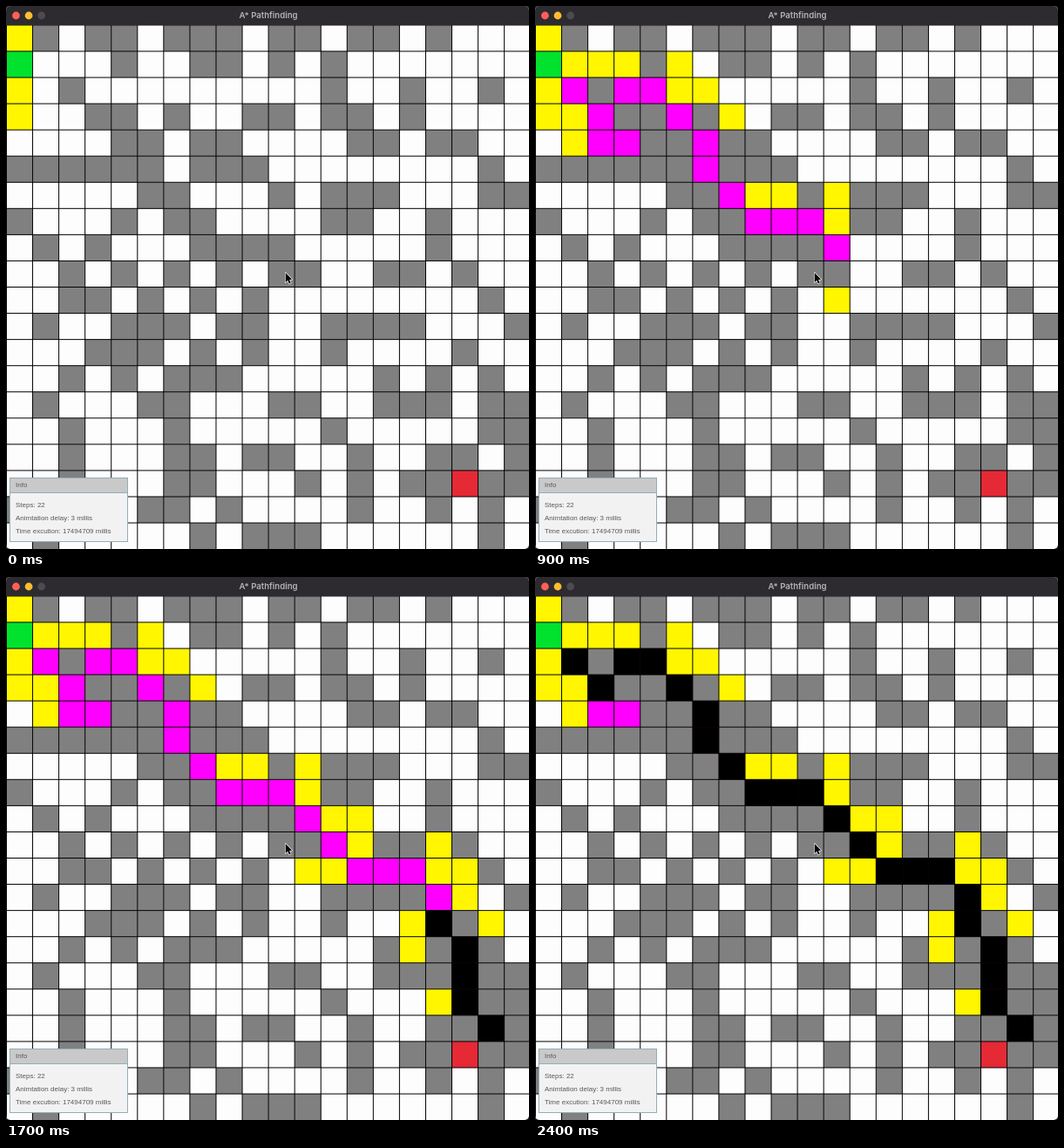
An HTML page with a canvas for the animation above (2.5 s loop, 600 by 623 pixels).

```html
<!DOCTYPE html>
<html lang="en">
<head>
<meta charset="utf-8">
<title>A* Pathfinding</title>
<style>
  html, body { margin: 0; width: 100%; height: 100%; overflow: hidden; background: #1c1b1e; }
  canvas { display: block; width: 600px; height: 623px; }
  h1 {
    position: absolute; left: 1px; top: 0; width: 600px; margin: 0;
    font: 600 9.6px/21px Inter, sans-serif; font-feature-settings: "calt" 0;
    color: #b4b3b6; text-align: center;
  }
</style>
</head>
<body>
<canvas id="stage" width="600" height="623"></canvas>
<h1>A* Pathfinding</h1>
<script>
const ctx = document.getElementById('stage').getContext('2d');
const W = 600, H = 623, SIZE = 20, PITCH = 30.06;
const LOOP = 2500, TICK = 100;
const COLORS = {
  wall: '#808080', open: '#fff600', closed: '#ff00ff', path: '#000',
  start: '#00e22d', goal: '#e52935'
};

const maze = [
  '.#.##.###.##.##.#...',
  '....#..##.#.#.......',
  '..#.........#..#..#.',
  '...##.#..##.##.#....',
  '....##.##....##.##..',
  '######.###........#.',
  '.....##...#.###...##',
  '#...#.##....##..#...',
  '.#.#...####.....#...',
  '..#.#.#.#.##..##.#..',
  '..##.#.#.#........#.',
  '.#..###.##..####...#',
  '...###.#.#..#....#..',
  '..#.#.###.....#.#.#.',
  '.#...##...##..###.##',
  '..#...#.....#.....##',
  '..#...##.##..#..##.#',
  '..#...##...#.#.##.##',
  '#....##.#....#..#.#.',
  '.#.....#.###......#.'
];

const cells = maze.map((row, y) => [...row].map((ch, x) => ({ x, y, wall: ch === '#' })));
const start = cells[1][0], goal = cells[17][17];
const toGoal = c => Math.hypot(goal.x - c.x, goal.y - c.y);

// Best-first search that records every repaint as [cell, colour].
// Cells opened on the right are painted one visit late.
function search() {
  const steps = [], open = [start], seen = new Set(open);
  const paint = (c, color) => steps.push([c, color]);
  let late = [], cur;

  while (!seen.has(goal)) {
    open.sort((a, b) => toGoal(a) - toGoal(b));
    cur = open.shift();
    const right = [];
    for (let dx = -1; dx <= 1; dx++) {
      for (let dy = -1; dy <= 1; dy++) {
        const next = cells[cur.y + dy]?.[cur.x + dx];
        if (!next || next.wall || seen.has(next)) continue;
        seen.add(next);
        next.from = cur;
        open.push(next);
        if (next === goal) continue;
        if (dx > 0) right.push(next);
        else paint(next, COLORS.open);
      }
      if (dx < 0) late.forEach(c => paint(c, COLORS.open));
    }
    late = right;
    if (cur !== start) paint(cur, COLORS.closed);
  }
  for (let c = goal.from; c !== start; c = c.from) paint(c, COLORS.path);
  return steps;
}

const steps = search();

// [tick, repaints done]
const pace = [[0, 3], [3, 18], [9, 45], [14, 75], [24, steps.length]];

function stepsAt(tick) {
  let i = 0;
  while (i < pace.length - 2 && tick >= pace[i + 1][0]) i++;
  const [t0, n0] = pace[i], [t1, n1] = pace[i + 1];
  return Math.round(n0 + (n1 - n0) * (tick - t0) / (t1 - t0));
}

// Grid line centres
const lineX = c => 0.5 + c * PITCH;
const lineY = r => 21.9 + r * PITCH;

function rect(x, y, w, h, color) {
  ctx.fillStyle = color;
  ctx.fillRect(x, y, w, h);
}

function fillCell({ x, y }, color) {
  rect(lineX(x), lineY(y), PITCH, PITCH, color);
}

function dot(x, y, r, color) {
  ctx.fillStyle = color;
  ctx.beginPath();
  ctx.arc(x, y, r, 0, Math.PI * 2);
  ctx.fill();
}

function drawGrid(count) {
  rect(0, 0, W, H, '#fefdfe');
  for (const c of cells.flat()) if (c.wall) fillCell(c, COLORS.wall);
  for (const [c, color] of steps.slice(0, count)) fillCell(c, color);
  fillCell(start, COLORS.start);
  fillCell(goal, COLORS.goal);
  for (let i = 0; i < SIZE; i++) {
    rect(lineX(i) - 0.5, 22, 1, H - 22, '#000');
    rect(0, lineY(i) - 0.5, W, 1, '#000');
  }
}

function drawTitleBar() {
  rect(0, 0, W, 22, '#2d2b30');
  ['#fe5f57', '#febc2e', '#4d4b50'].forEach((color, i) => dot(11.5 + i * 14.6, 11, 4.4, color));
}

function drawPanel() {
  rect(4, 541, 136, 74, '#93aeb6');
  rect(5, 542, 134, 16, '#c9c9c9');
  rect(5, 559, 134, 55, '#f3f2f3');
  ctx.font = '8px "Liberation Sans", Arial, sans-serif';
  ctx.fillStyle = '#585858';
  ctx.fillText('Info', 11, 552);
  ['Steps: 22', 'Animtation delay: 3 millis', 'Time excution: 17494709 millis']
    .forEach((line, i) => ctx.fillText(line, 11, 574.5 + i * 15));
}

function drawCursor() {
  ctx.save();
  ctx.translate(320.7, 306);
  ctx.beginPath();
  ctx.moveTo(0, 0);
  for (const [x, y] of [[0, 11], [2.5, 8.8], [4.2, 12.5], [6, 11.7], [4.4, 8], [7.4, 7.8]])
    ctx.lineTo(x, y);
  ctx.closePath();
  ctx.lineWidth = 1.4;
  ctx.lineJoin = 'round';
  ctx.strokeStyle = '#f4f4f4';
  ctx.stroke();
  ctx.fillStyle = '#000';
  ctx.fill();
  ctx.restore();
}

function draw(now) {
  const tick = Math.floor((now % LOOP) / TICK);
  rect(0, 0, W, H, '#1c1b1e');
  ctx.save();
  ctx.beginPath();
  ctx.roundRect(0, 0, W, H, 5);
  ctx.clip();
  drawGrid(stepsAt(tick));
  drawTitleBar();
  drawPanel();
  drawCursor();
  ctx.restore();
}

const begin = performance.now();
function loop() {
  draw(performance.now() - begin);
  requestAnimationFrame(loop);
}
loop();
</script>
</body>
</html>
```
